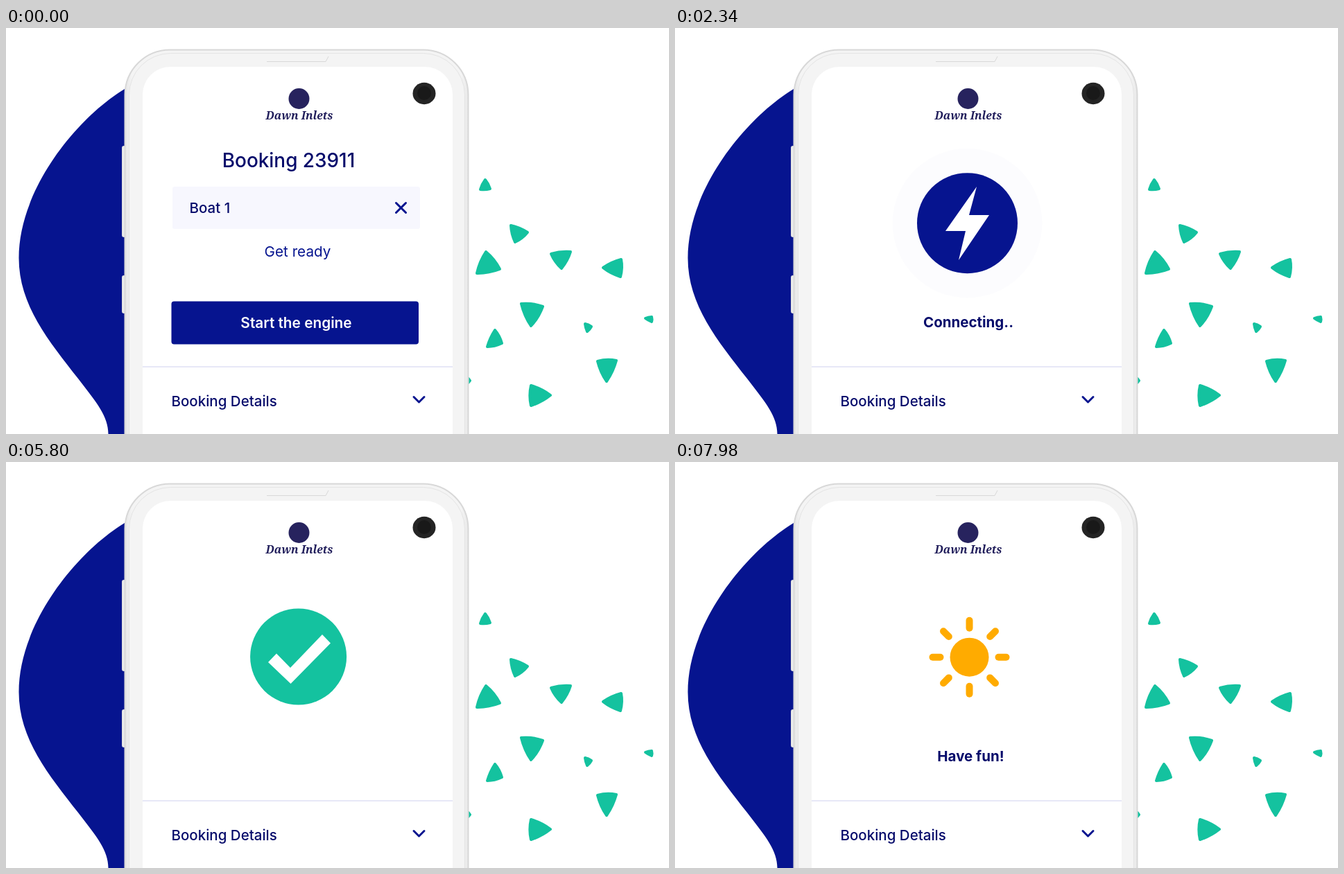
Recreate the animation shown at these times as an HTML page. Size 956 by 586 pixels, loop 8 s.

```html
<!DOCTYPE html>
<html lang="en">
<head>
<meta charset="utf-8">
<title>Boat booking</title>
<style>
  html, body { margin: 0; width: 100%; height: 100%; overflow: hidden; background: #fff; }
  svg { display: block; }
  text { font-family: Inter, "Open Sans", sans-serif; font-weight: 500; font-size: 20.5px; fill: #060b6b; }
  .mid { text-anchor: middle; }
  .bold { font-weight: 700; }
  .brand { font: italic 700 15.8px "Noto Serif", "Liberation Serif", serif; fill: #211e5b; }
  .line { fill: none; stroke: #06148f; stroke-width: 3; stroke-linecap: round; stroke-linejoin: round; }
</style>
</head>
<body>
<svg width="956" height="586" viewBox="0 0 956 586">
  <defs>
    <linearGradient id="rim" x1="0" x2="1" y1="0" y2="0">
      <stop offset="0" stop-color="#e6e6e6"/>
      <stop offset=".02" stop-color="#f4f4f4"/>
      <stop offset=".98" stop-color="#f4f4f4"/>
      <stop offset="1" stop-color="#e8e8e8"/>
    </linearGradient>
  </defs>

  <path fill="#06148f" d="M180 83C109 121 18.500 229 18.500 332C18.500 400 62 452 104 506C130 540 147.500 560 147.500 586H180Z"/>
  <g id="confetti" fill="#14c29f" stroke="#14c29f" stroke-width="4" stroke-linejoin="round"></g>

  <g id="phone">
    <g fill="#ececec" stroke="#d9d9d9">
      <rect x="167.500" y="170.500" width="6" height="131" rx="2"/>
      <rect x="167.500" y="357.500" width="6" height="54" rx="2"/>
    </g>
    <rect x="171.500" y="31.500" width="495" height="620" rx="65" fill="url(#rim)" stroke="#d8d8d8" stroke-width="2"/>
    <rect x="177.500" y="36.500" width="484" height="620" rx="60" fill="#f4f4f4" stroke="#e4e4e4"/>
    <path d="M376 48.500H461L465 41" fill="none" stroke="#d8d8d8"/>
    <rect x="197" y="56" width="447" height="600" rx="40" fill="#fff"/>
    <ellipse cx="603" cy="94.500" rx="16.500" ry="15.700" fill="#242424"/>
    <circle cx="603" cy="94" r="10" fill="#191919"/>
  </g>

  <circle cx="422.500" cy="102" r="15" fill="#27235e"/>
  <text class="brand mid" x="423" y="132">Dawn Inlets</text>

  <path d="M197 489H644" stroke="#dfe1f4" stroke-width="1.500"/>
  <text x="238.500" y="546">Booking Details</text>
  <path class="line" d="M588 532.500L595.500 540L603 532.500"/>

  <g id="booking">
    <text class="mid" x="407.500" y="201" style="font-size:27.900px">Booking 23911</text>
    <rect x="240" y="229" width="357" height="61" rx="3" fill="#f7f7fe"/>
    <text x="264.500" y="267">Boat 1</text>
    <path class="line" d="M562.500 252.500L576.500 266.500M576.500 252.500L562.500 266.500"/>
    <text class="mid" x="420.500" y="329.500" style="font-size:20.700px;font-weight:400;fill:#06148f">Get ready</text>
    <rect x="238.500" y="394.500" width="356.500" height="62" rx="4" fill="#06148f"/>
    <text class="mid" x="418.500" y="433" style="font-size:20.800px;font-weight:600;fill:#fff">Start the engine</text>
  </g>

  <circle id="pulse" cx="421.500" cy="281.700" r="72" fill="#06148f"/>
  <g id="power">
    <circle cx="421.500" cy="281.700" r="72.500" fill="#06148f"/>
    <path fill="#fff" d="M435 229L424 270H453L409 335L419 293H390Z"/>
  </g>
  <text id="connecting" class="mid bold" x="423" y="431.500">Connecting..</text>

  <g id="done">
    <circle id="disc" cx="421.600" cy="281" r="69.500" fill="#14c29f"/>
    <path id="tick" fill="#fff" d="M378 289L390 276.500L410 297L456 249L468 261.500L410.500 320Z"/>
  </g>

  <g id="sun" transform="translate(424.500 281.700)">
    <circle id="core" r="28" fill="#ffab00"/>
    <g id="rays" stroke="#ffab00" stroke-width="10" stroke-linecap="round"></g>
  </g>
  <text id="fun" class="mid bold" x="426.500" y="431.500">Have fun!</text>
</svg>

<script>
const LOOP = 8000;
const el = id => document.getElementById(id);
const make = (parent, tag, attrs) => {
  const node = document.createElementNS('http://www.w3.org/2000/svg', tag);
  for (const key in attrs) node.setAttribute(key, attrs[key]);
  return parent.appendChild(node);
};

const triangles = [
  '691,219 698,232 684,233', '728,285 752,295 734,309', '692,323 712,348 679,354',
  '786,326 814,323 801,347', '887,334 886,359 861,346', '743,398 774,402 757,430',
  '705,436 715,455 694,460', '835,427 844,431 838,438', '922,419 931,417 931,424',
  '853,481 880,480 866,510', '757,516 785,530 757,545', '664,504 669,509 664,514'
];

// Triangle whose sides bow slightly outwards.
function bulgedPath(points) {
  const corners = points.split(' ').map(p => p.split(',').map(Number));
  const center = [0, 1].map(k => corners.reduce((sum, c) => sum + c[k], 0) / 3);
  const sides = corners.map((a, i) => {
    const b = corners[(i + 1) % 3];
    const control = [0, 1].map(k => {
      const middle = (a[k] + b[k]) / 2;
      return middle + (middle - center[k]) * 0.35;
    });
    return `Q${control} ${b}`;
  });
  return `M${corners[0]}${sides.join('')}Z`;
}
triangles.forEach(points => make(el('confetti'), 'path', { d: bulgedPath(points) }));

const rays = Array.from({ length: 8 }, (_, i) =>
  make(el('rays'), 'path', { d: 'M0 -42V-53', transform: `rotate(${i * 45})` }));

const progress = (t, from, to) => Math.min(1, Math.max(0, (t - from) / (to - from)));
const easeOut = p => 1 - (1 - p) ** 3;
const easeInOut = p => p * p * (3 - 2 * p);

const show = (node, opacity) => {
  node.setAttribute('opacity', opacity);
  node.setAttribute('visibility', opacity > 0 ? 'visible' : 'hidden');
};
const scaleAt = (node, x, y, s) =>
  node.setAttribute('transform', `translate(${x} ${y}) scale(${s}) translate(${-x} ${-y})`);

function drawPulse(t) {
  const start = t < 2400 ? 1620 : 2400;
  const p = progress(t, start, start + 780);
  el('pulse').setAttribute('r', 72 + 36 * easeOut(p));
  show(el('pulse'), t >= 1620 && t < 3180 ? 0.14 * (1 - p) : 0);
}

function drawConnecting(t) {
  const enter = easeOut(progress(t, 1640, 1900));
  const leave = progress(t, 3910, 4130);
  show(el('connecting'), enter * (1 - leave));
  scaleAt(el('connecting'), 423, 423.5, 0.93 + 0.07 * enter - 0.07 * leave);
}

function drawDone(t) {
  const settle = easeInOut(progress(t, 3920, 5220)) - easeInOut(progress(t, 5800, 6100));
  el('disc').setAttribute('r', 71.6 - 2.1 * settle);
  scaleAt(el('tick'), 423, 284.5, 0.967 + 0.033 * settle);
  show(el('done'), progress(t, 3910, 4180) * (1 - progress(t, 5800, 6100)));
}

function drawSun(t) {
  el('core').setAttribute('r', 28 * easeOut(progress(t, 6120, 6600)));
  show(el('core'), progress(t, 6120, 6360));
  rays.forEach((ray, i) => show(ray, progress(t, 6720 + i * 100, 6920 + i * 100)));

  const enter = easeOut(progress(t, 7100, 7500));
  show(el('fun'), enter);
  scaleAt(el('fun'), 426.5, 423.5, 0.93 + 0.07 * enter);
}

function draw(t) {
  show(el('booking'), t < 1260 ? 1 : 0);
  show(el('power'), t < 3920 ? progress(t, 1490, 1675) : 0);
  drawPulse(t);
  drawConnecting(t);
  drawDone(t);
  drawSun(t);
}

const begin = performance.now();
function tick() {
  draw((performance.now() - begin) % LOOP);
  requestAnimationFrame(tick);
}
draw(0);
requestAnimationFrame(tick);
</script>
</body>
</html>
```
